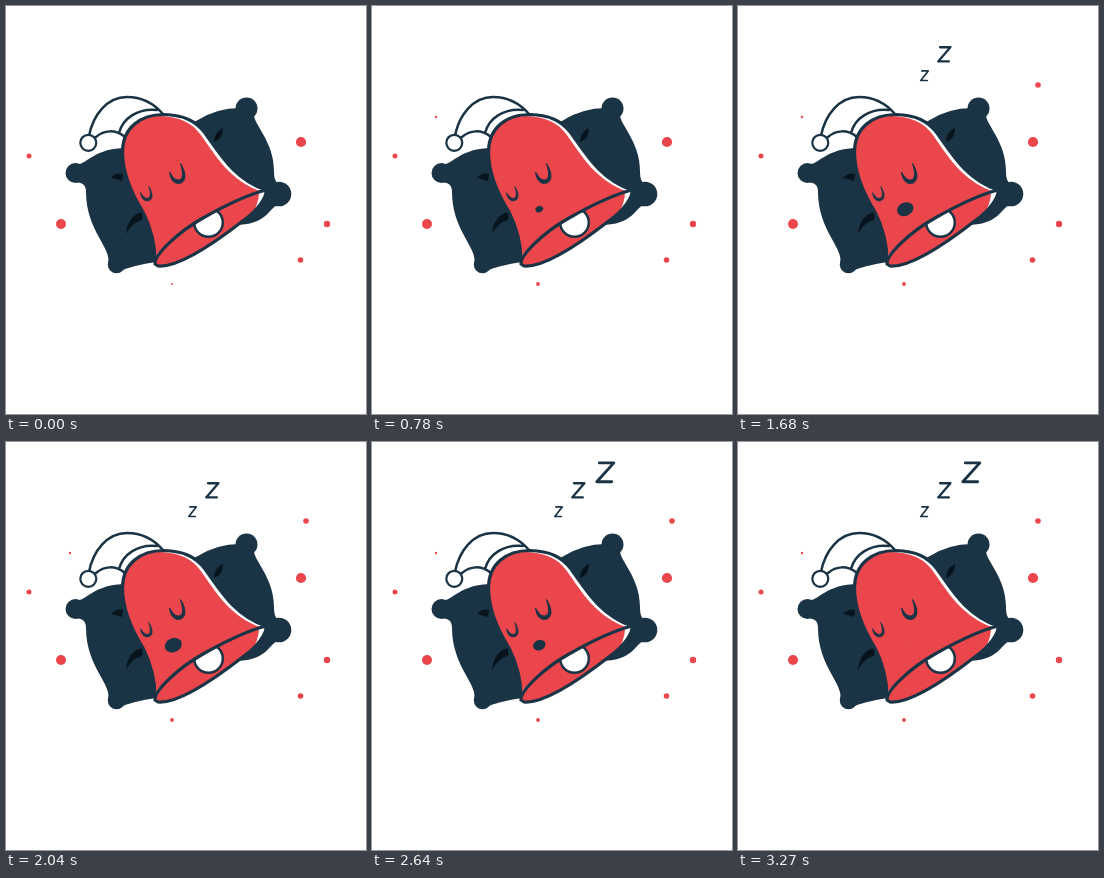
Animation of 360 by 408 pixels, one loop 3300 ms. Source, as an HTML page:

```html
<!DOCTYPE html>
<html lang="en">
<head>
<meta charset="utf-8">
<title>Sleeping bell</title>
<style>
html, body { margin: 0; width: 100%; height: 100%; overflow: hidden; background: #fff; }
svg { display: block; width: 360px; height: 408px; }
.line { fill: none; stroke: #1a3445; stroke-linecap: round; stroke-linejoin: round; }
.navy { fill: #1a3445; }
.red { fill: #ea464c; }
.white { fill: #fff; }
.crease { fill: #07141d; }
</style>
</head>
<body>
<svg viewBox="0 0 360 408">
  <defs>
    <path id="body" d="M149 255C149 238 145 222 137 206C127 190 116.500 170 116.500 146C116.500 122 134 108.500 158 108.500C178 109 190 115 199 127C214 148 229 174 260 184C217 198 171 224 149 255Z"/>
    <path id="rim" d="M149 258C148 249 172 226 197 212C220 199 244 188 260 184C261 191 252 204 238 214C215 232 175 262 152 260Z"/>
    <path id="eye" d="M0 8.500C1 16 4 20 9 20C17 19.500 17.500 10 11 0C14 10 14 16 9 16.500C5 16.500 3 13 0 8.500Z" stroke="#1a3445" stroke-linejoin="round"/>
    <clipPath id="bodyClip"><use href="#body"/></clipPath>
    <clipPath id="rimClip"><use href="#rim"/></clipPath>
  </defs>

  <g id="dots" class="red"></g>

  <g class="navy">
    <circle cx="69.500" cy="167" r="10"/>
    <circle cx="240.500" cy="102.500" r="11"/>
    <circle cx="273" cy="188" r="12.300"/>
    <circle cx="110.500" cy="258.500" r="8.700"/>
    <path d="M67 158C78 163 85 142 120 142L190 115Q210 102 234 102L248 108C247 118 268 135 268 165C268 174 270 177 275 180L272 199C262 202 262 219 228 219L150 256Q124 260 115 265L102 258C107 243 80 225 80 186C80 179 77 177 70 176Z"/>
  </g>
  <g class="crease">
    <path d="M105 172Q110 166 117 168L116 175Q110 173 105 172Z"/>
    <path d="M120 228C121 215 128 207 137 206L136 214C128 216 124 221 120 228Z"/>
    <path d="M208 136C208 129 212 124 217 122C217 129 214 134 208 136Z"/>
  </g>

  <g class="line" stroke-width="2.500">
    <path d="M83 130C87 109 101 91 121 91C138 91 150 100 157 108M90 131C98 124 109 123 119 131M113 127C117 112 132 102 151 104"/>
    <circle class="white" style="fill:#fff" cx="82.300" cy="136.800" r="8" stroke-width="2.200"/>
  </g>

  <!-- the red fill sits off the white one, leaving a highlight on the right -->
  <use href="#body" class="white"/>
  <g clip-path="url(#bodyClip)">
    <use href="#body" class="red" x="-4.500" y="1.600"/>
    <path class="red" d="M149 256L118 170L116 130L160 200Z"/>
  </g>
  <use href="#body" class="line" stroke-width="3.200"/>
  <use href="#rim" class="red"/>
  <g clip-path="url(#rimClip)">
    <path class="white" d="M260 183Q260 194 249 203Q253 194 253 186Z"/>
    <circle class="line" style="fill:#fff" cx="202.500" cy="216.500" r="14.300" stroke-width="2.500"/>
  </g>
  <use href="#rim" class="line" stroke-width="3.200"/>

  <use href="#eye" class="navy" transform="translate(163.500 157.500)"/>
  <use href="#eye" class="navy" transform="translate(134.500 180.500) scale(.75 .72)"/>
  <ellipse id="mouth" class="navy" rx="8.800" ry="7"/>
  <g id="snore" class="line"></g>
</svg>
<script>
const LOOP = 3300, POP = 120, GROW = 420;
const NS = "http://www.w3.org/2000/svg";
const get = id => document.getElementById(id);
const ramp = (t, a, b) => Math.min(1, Math.max(0, (t - a) / (b - a)));
const ease = u => u * u * (3 - 2 * u);

function add(parent, tag, attrs) {
  const el = document.createElementNS(NS, tag);
  for (const k in attrs) el.setAttribute(k, attrs[k]);
  return parent.appendChild(el);
}

// x, y, radius, time at which growth begins
const dots = [
  [295, 136, 5.1], [55, 218, 5], [23, 150, 2.5], [321, 218, 3.2], [294.5, 254, 2.8],
  [166, 278, 1.9, -210], [64, 111, 1.2, 0], [300, 79, 2.8, 1200]
].map(([cx, cy, r, from = -GROW]) => ({ el: add(get("dots"), "circle", { cx, cy }), r, from }));

// each letter is larger, higher and later than the one before
const letters = [0, 1, 2].map(i => {
  const a = 3.7 + 2.4 * i, b = 4.8 + 2.3 * i;
  const d = `M${-a * .7} ${-b}H${a}L${-a} ${b}H${a * .75}`;
  return {
    el: add(get("snore"), "path", { d, "stroke-width": 1.7 + .6 * i }),
    x: 186.5 + 16.2 * i + 3.6 * i * i,
    y: 69.7 - 23 * i + 1.65 * i * i,
    from: 840 + 660 * i
  };
});

function draw(t) {
  for (const d of dots) d.el.setAttribute("r", d.r * ease(ramp(t, d.from, d.from + GROW)));
  for (const z of letters) {
    const k = ease(ramp(t, z.from, z.from + POP));
    z.el.setAttribute("transform", `translate(${z.x} ${z.y}) scale(${k})`);
    z.el.style.visibility = k > 0 ? "visible" : "hidden";
  }
  const open = ramp(t, 0, 1750) * (1 - ramp(t, 2400, LOOP));
  get("mouth").setAttribute("transform", `translate(167.3 203.2) rotate(-24) scale(${open})`);
}

const start = performance.now();
function tick(now) {
  draw(Math.max(0, now - start) % LOOP);
  requestAnimationFrame(tick);
}
draw(0);
requestAnimationFrame(tick);
</script>
</body>
</html>
```
